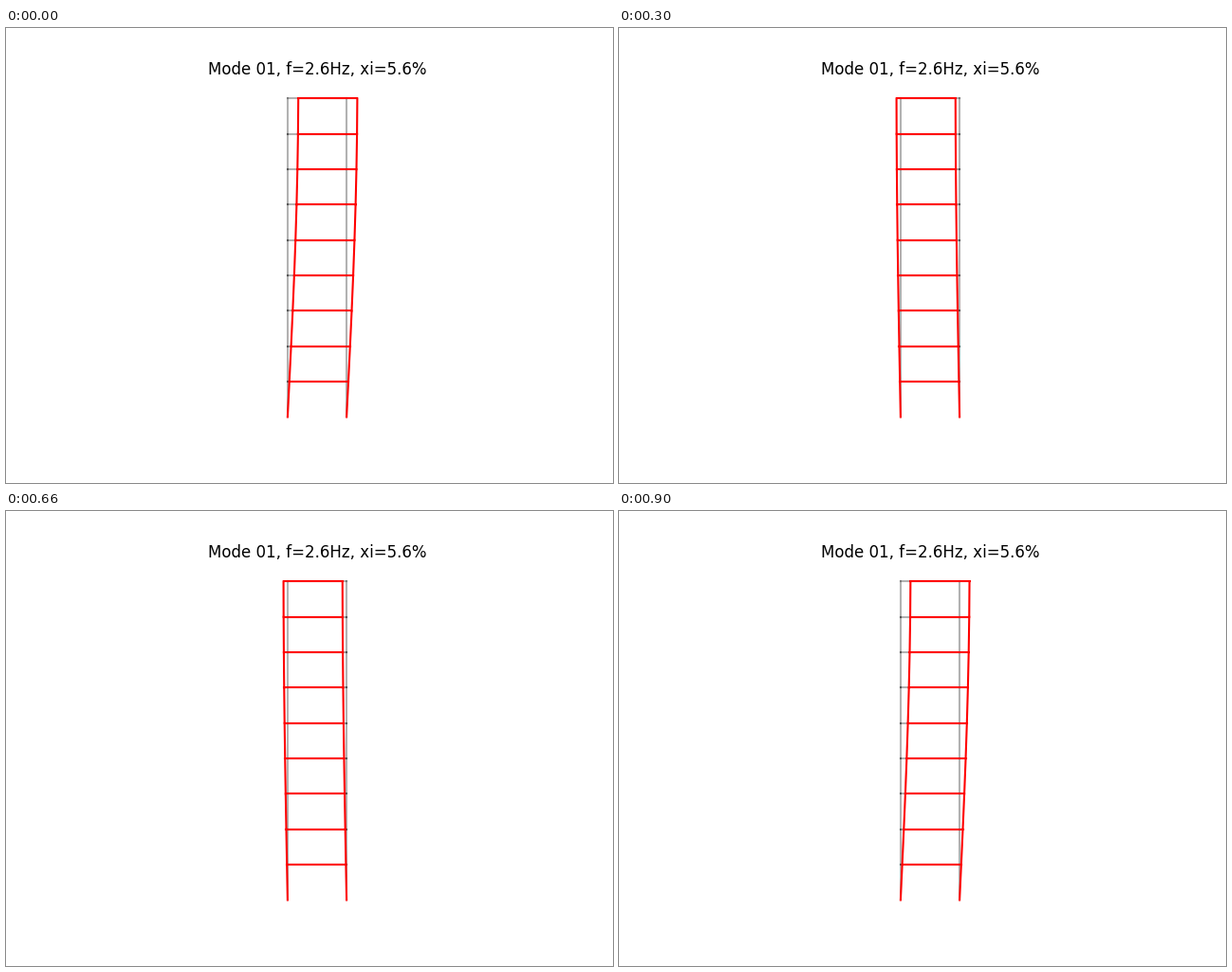
A matplotlib script for the animation above (960 ms loop, 640 by 480 pixels).

```python
import numpy as np
import matplotlib.pyplot as plt
from matplotlib.animation import FuncAnimation

FLOORS = 9
FRAMES = 16
INTERVAL = 60
WIDTH = FLOORS * 62.2 / 336     # bay width in storey heights
SWAY = FLOORS * 11.3 / 336      # peak roof displacement

levels = np.arange(FLOORS + 1)
shape = np.sin(np.pi * levels / (2 * FLOORS + 1))
shape /= shape[-1]


def members(offset):
    """Columns and beams of the frame, displaced sideways per level."""
    left = np.column_stack([offset - WIDTH / 2, levels])
    right = left + [WIDTH, 0]
    parts = []
    for k in range(FLOORS):
        parts += [left[k:k + 2], right[k:k + 2]]
        parts.append(np.array([left[k + 1], right[k + 1]]))
    return parts


def draw_frame(ax, **style):
    return [ax.plot(*part.T, **style)[0] for part in members(0 * shape)]


fig, ax = plt.subplots(figsize=(6.4, 4.8), dpi=100)
draw_frame(ax, color="black", alpha=0.3, lw=1.5)
moving = draw_frame(ax, color="red", lw=1.5)
ax.set_aspect("equal", adjustable="datalim")
margin = 0.05 * FLOORS
ax.set_ylim(-margin, FLOORS + margin)
half_span = (FLOORS + 2 * margin) * 496 / 369.6 / 2
ax.set_xlim(-half_span, half_span)
ax.set_title("Mode 01, f=2.6Hz, xi=5.6%", fontsize=12)
ax.axis("off")


def update(i):
    offset = SWAY * np.cos(2 * np.pi * i / FRAMES) * shape
    for line, part in zip(moving, members(offset)):
        line.set_data(*part.T)
    return moving


anim = FuncAnimation(fig, update, frames=FRAMES, interval=INTERVAL,
                     repeat=True, repeat_delay=0, blit=False)
plt.show()
```
